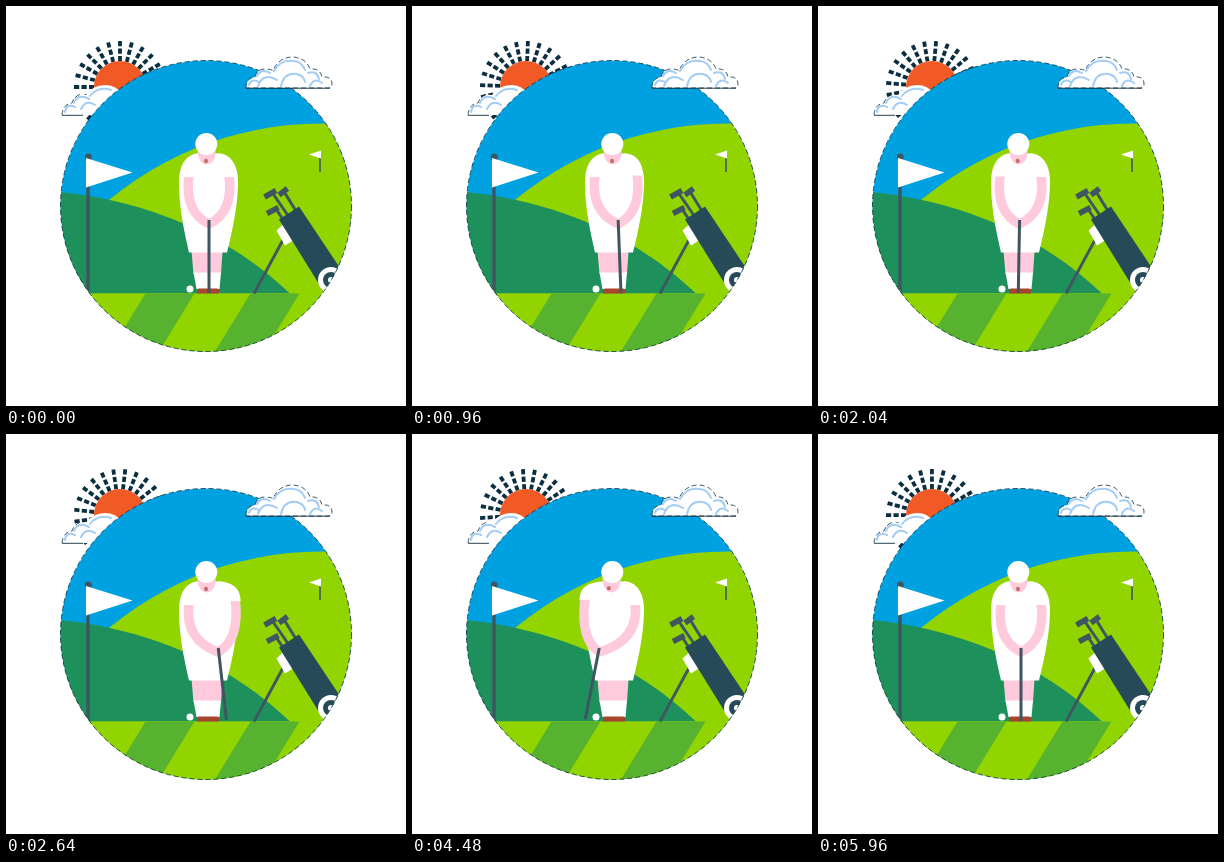
Animation of 400x400 px, one loop 6 s. Source, as an HTML page:

```html
<!DOCTYPE html>
<html lang="en">
<head>
<meta charset="utf-8">
<title>Golfer</title>
<style>
  html, body { margin: 0; width: 100%; height: 100%; overflow: hidden; background: #fff; }
  svg { display: block; width: 100vw; height: 100vh; }
  .steel { stroke: #3f5560; fill: none; }
  .white { fill: #fff; }
  .skin { fill: #ffcbdc; }
  .lime { fill: #92d400; }
  .edge { fill: none; stroke: #0b2f40; stroke-width: .8; stroke-dasharray: 5 3; }
  .base { stroke: #0b2f40; stroke-width: .9; }
  .puff { fill: none; stroke: #a3cdf4; stroke-width: 2; stroke-linecap: round; }
</style>
</head>
<body>
<svg viewBox="0 0 400 400">
  <defs>
    <clipPath id="disc"><circle cx="200" cy="200" r="145.5"/></clipPath>
    <path id="cloud" d="M240 82Q240 72 249 71Q251 63 259 63Q264 63 267 64.500Q273 51 287 51Q300 52 304 63Q314 62 316 71Q326 70 326 78Q326 82 322 82Z"/>
  </defs>

  <g id="rays" stroke="#0b2f40" stroke-width="3.8" stroke-dasharray="5.2 2.3"></g>
  <circle cx="114" cy="81" r="26" fill="#f15a24"/>

  <g id="leftCloud">
    <path class="white" d="M56 109Q57 98 66 97Q70 87 80 89Q87 79 99 79Q110 79 116 88L120 109Z"/>
    <path class="edge" d="M56 109Q57 98 66 97Q69 89 76 88"/>
    <path class="base" d="M56 109.300H77"/>
    <path class="puff" d="M59 106Q60 97 69 101M68 97Q72 87 83 93M75 103Q80 93 89 99M84 90Q92 80 105 84"/>
  </g>

  <g clip-path="url(#disc)">
    <rect x="50" y="50" width="300" height="300" fill="#00a1e1"/>
    <circle class="lime" cx="315" cy="449.500" r="332"/>
    <path fill="#1d905c" d="M50 185.500C140 194 222 228 284 287.500H50Z"/>
    <rect class="lime" x="50" y="287.500" width="300" height="62"/>
    <path fill="#56b22f" d="M139.500 287.500H188.500L152 347H103ZM244.500 287.500H293.500L257 347H208Z"/>

    <path class="steel" stroke-width="3.4" d="M82 151V287.500"/>
    <circle cx="82.300" cy="151" r="3.500" fill="#3f5560"/>
    <path class="white" d="M80 152L126.500 166.500L80 181.500Z"/>
    <path class="steel" stroke-width="1.6" d="M314 147V166"/>
    <path class="white" d="M315 144.500L303 148.500L315 152.500Z"/>

    <path class="steel" stroke-width="2.8" d="M277.500 233L248 287.500"/>
    <path class="steel" stroke-width="3" d="M283 211L266.500 187M290 205L277 184M278 215L270 203"/>
    <path class="steel" stroke-width="5.500" d="M258.500 191L270 184.500M273 189L281.500 182.500M261 207.500L272.500 201.500"/>
    <path class="white" d="M270.500 224.500L277 218.500L287 234.500L279 239.500Z"/>
    <path fill="#264a58" d="M273 213.500L293 200.500L334 262L313 278Z"/>
    <circle class="white" cx="325" cy="274" r="13"/>
    <circle cx="325" cy="274" r="8" fill="#264a58"/>
    <circle class="white" cx="325" cy="274" r="3"/>

    <path class="skin" d="M185.500 245H216.500L215 268H187.500Z"/>
    <path class="white" d="M187.500 266.500H215L213.500 283H190.500Z"/>
    <path fill="#a8452f" d="M191 287.500V284.500Q191 282.500 193 282.500H211Q213 282.500 213 284.500V287.500Z"/>
    <path class="white" d="M192 147.500C181 148 173 158 173 176C173 202 178 225 183 246.500H221C227 222 232 198 232 176C232 158 224 148 213 147.500Z"/>
    <g fill="none">
      <path id="arms" stroke="#ffcbdc" stroke-width="9.500" stroke-linejoin="round"/>
      <path id="sleeves" stroke="#fff" stroke-width="11"/>
      <path id="club" class="steel" stroke-width="3"/>
    </g>
    <path id="neck" class="skin" d="M191.500 144H209.500Q210 157.500 200.500 158.500Q192 157.500 191.500 144Z"/>
    <ellipse id="mouth" cx="200" cy="155" rx="2" ry="2.200" fill="#c0706c"/>
    <circle class="white" cx="200.300" cy="138" r="11"/>
    <circle id="ball" class="white" r="3.500"/>
  </g>
  <circle class="edge" cx="200" cy="200" r="145.500"/>

  <g id="rightCloud">
    <use href="#cloud" class="white"/>
    <use href="#cloud" class="edge"/>
    <path class="base" d="M240 82.200H324"/>
    <path class="puff" d="M243 79Q245 72 253 76M251 70Q255 62 264 67M252 80Q257 66 271 74M268 65Q274 53 288 55Q296 56 299 64M275 80Q278 66 291 68Q298 70 299 76M302 67Q311 64 313 73M304 80Q308 71 316 77"/>
  </g>
</svg>
<script>
const LOOP = 6000;
const $ = id => document.getElementById(id);
const set = (id, attrs) => {
  for (const key in attrs) $(id).setAttribute(key, attrs[key]);
};

// [time, swing]: positive is backswing, negative is follow-through
const SWING = [
  [0, 0], [800, .38], [1960, -.2], [2700, 1.05], [3080, -1.75],
  [4480, -1.75], [5720, 0], [LOOP, 0]
];

const easeInOut = p => p * p * (3 - 2 * p);

function swingAt(t) {
  const i = SWING.findIndex(k => k[0] > t);
  const [t0, a] = SWING[i - 1], [t1, b] = SWING[i];
  return a + (b - a) * easeInOut((t - t0) / (t1 - t0));
}

// The ball leaves on the left and comes back in from the right.
function ballAt(t) {
  if (t < 2960 || t >= 4440) return [184, 283];
  if (t < 3580) {
    const p = (t - 2960) / 560;
    return [184 - 113 * p, 254 + 29 * (1 - p) ** 2];
  }
  const rest = 1 - (t - 3580) / 860;
  return [184 + 176 * rest ** 3, 283 - 58 * rest ** 2];
}

for (let i = 0; i < 24; i++) {
  const ray = document.createElementNS("http://www.w3.org/2000/svg", "path");
  ray.setAttribute("d", "M114 35V55");
  ray.setAttribute("transform", `rotate(${i * 15} 114 81)`);
  $("rays").append(ray);
}

function draw(t) {
  set("rays", { transform: `rotate(${15 * t / LOOP} 114 81)` });

  const s = swingAt(t), back = Math.max(s, 0), thru = Math.min(s, 0);
  const hand = 203 + 9 * s;
  const lx = 183 + 5.7 * thru, ly = 171 + 3 * thru;
  const rx = 223 + 6 * back, ry = 171 - 4 * back;
  set("arms", {
    d: `M${lx} ${ly - 2}Q${lx - 5} 206 ${hand} 218Q${rx + 5} 206 ${rx} ${ry - 2}`
  });
  set("sleeves", {
    d: `M193 153Q${lx} 153 ${lx} ${ly}M212 153Q${rx} 153 ${rx} ${ry}`
  });
  set("club", { d: `M${hand} 214L${203 + 17 * s} ${287 - Math.abs(s)}` });
  set("neck", { transform: `translate(${thru * .6} 0)` });
  set("mouth", { cx: 200 + thru * 1.8, cy: 155 + thru * .5 });

  const [cx, cy] = ballAt(t);
  set("ball", { cx, cy });
}

const start = performance.now();
function tick(now) {
  draw(Math.max(0, now - start) % LOOP);
  requestAnimationFrame(tick);
}
draw(0);
requestAnimationFrame(tick);
</script>
</body>
</html>
```
